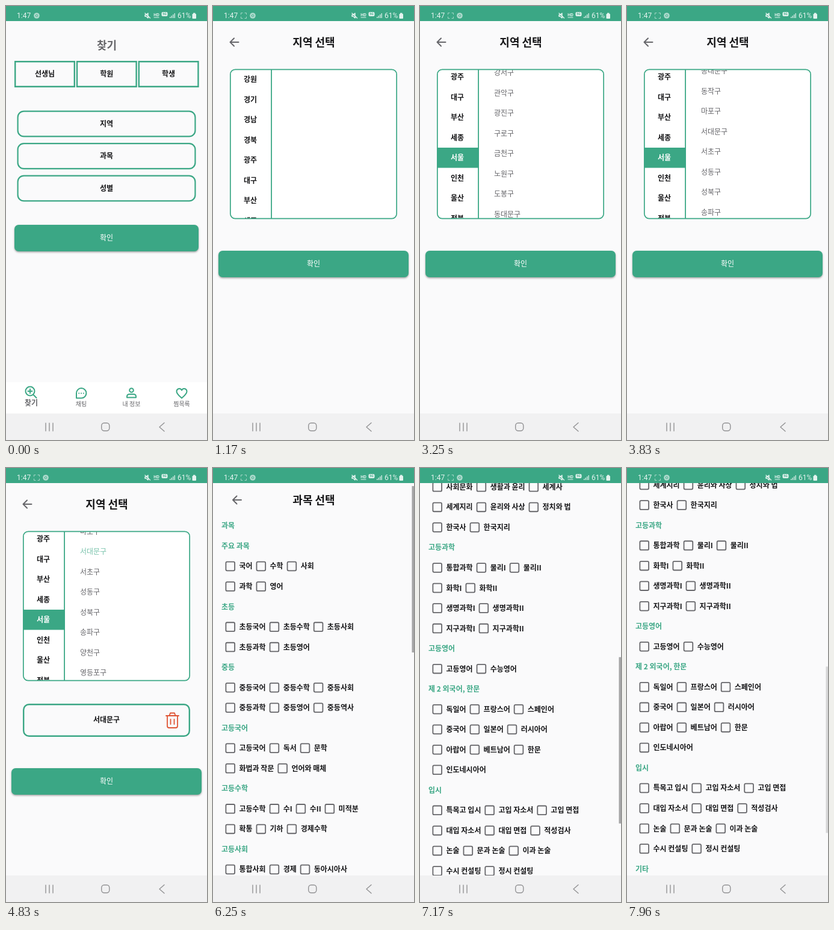
Write an HTML page with a canvas that moves like this. It is 334x720 px and loops after 8000 ms.

```html
<!DOCTYPE html>
<html lang="ko">
<head>
<meta charset="utf-8">
<style>
  html, body { margin: 0; width: 100%; height: 100%; overflow: hidden; background: #fafafa; }
  canvas { display: block; width: 334px; height: 720px; }
</style>
</head>
<body>
<canvas id="stage"></canvas>
<script>
const LOOP = 8000, W = 334, H = 720, ROW = 33.53, TOP = 25, BOTTOM = 676;
const GREEN = '#3ba785', PAGE = '#fafafb', GRAY = '#66666a', INK = '#151517';
const KOREAN = '"Noto Sans CJK KR", "Noto Sans CJK", sans-serif';

// Moments when the app changes state
const OPEN_REGION = 920, SHOW_DISTRICTS = 2500, PICK_CITY = 2640,
      PICK_DISTRICT = 4680, BACK_HOME = 5400, OPEN_SUBJECTS = 5970;

const cities = '강원 경기 경남 경북 광주 대구 부산 세종 서울 인천 울산 전북'.split(' ');
const districts = ('강남 강동 강북 강서 관악 광진 구로 금천 노원 도봉 동대문 동작 마포 서대문 ' +
  '서초 성동 성북 송파 양천 영등포 용산 은평 종로').split(' ').map(name => name + '구');
const subjects = `#과목
#주요 과목
국어,수학,사회
과학,영어
#초등
초등국어,초등수학,초등사회
초등과학,초등영어
#중등
중등국어,중등수학,중등사회
중등과학,중등영어,중등역사
#고등국어
고등국어,독서,문학
화법과 작문,언어와 매체
#고등수학
고등수학,수I,수II,미적분
확통,기하,경제수학
#고등사회
통합사회,경제,동아시아사
사회문화,생활과 윤리,세계사
세계지리,윤리와 사상,정치와 법
한국사,한국지리
#고등과학
통합과학,물리I,물리II
화학I,화학II
생명과학I,생명과학II
지구과학I,지구과학II
#고등영어
고등영어,수능영어
#제 2 외국어, 한문
독일어,프랑스어,스페인어
중국어,일본어,러시아어
아랍어,베트남어,한문
인도네시아어
#입시
특목고 입시,고입 자소서,고입 면접
대입 자소서,대입 면접,적성검사
논술,문과 논술,이과 논술
수시 컨설팅,정시 컨설팅
#기타`.split('\n');

const cityScroll = [[1420, 0], [1720, 78], [2170, 138]];
const districtScroll = [[2820, 0], [3200, 95], [3830, 349], [4050, 402], [4460, 418.5]];
const subjectScroll = [[6250, 0], [6450, 145], [6790, 510.6], [7080, 650], [7500, 705]];

const canvas = document.getElementById('stage');
const ctx = canvas.getContext('2d');
const ratio = window.devicePixelRatio || 1;
canvas.width = W * ratio;
canvas.height = H * ratio;

const clamp = x => Math.max(0, Math.min(1, x));

// Smooth monotone curve through [time, value] points, at rest at both ends
function track(points, t) {
  const last = points.length - 1;
  if (t <= points[0][0]) return points[0][1];
  if (t >= points[last][0]) return points[last][1];
  const slope = i => (points[i + 1][1] - points[i][1]) / (points[i + 1][0] - points[i][0]);
  const tangent = i => i === 0 || i === last ? 0
    : 2 * slope(i - 1) * slope(i) / (slope(i - 1) + slope(i));
  const i = points.findIndex((p, k) => t < points[k + 1][0]);
  const [t0, a] = points[i], [t1, b] = points[i + 1];
  const d = t1 - t0, u = (t - t0) / d, v = 1 - u;
  return a * (1 + 2 * u) * v * v + b * u * u * (3 - 2 * u)
    + d * u * v * (v * tangent(i) - u * tangent(i + 1));
}

// Text whose glyphs are vertically centred on y
function text(str, x, y, { size = 12, weight = 700, color = INK, align = 'center', family = KOREAN } = {}) {
  ctx.font = `${weight} ${size}px ${family}`;
  ctx.textAlign = align;
  ctx.fillStyle = color;
  ctx.fillText(str, x, y + size * 0.37);
}

function fillRect(x, y, w, h, color) {
  ctx.fillStyle = color;
  ctx.fillRect(x, y, w, h);
}

function box(x, y, w, h, radius, { fill, stroke, line = 2 }) {
  const inset = stroke ? line / 2 : 0;
  ctx.beginPath();
  ctx.roundRect(x + inset, y + inset, w - 2 * inset, h - 2 * inset, radius);
  if (fill) { ctx.fillStyle = fill; ctx.fill(); }
  if (stroke) { ctx.strokeStyle = stroke; ctx.lineWidth = line; ctx.stroke(); }
}

function icon(path, x, y, color, line = 2) {
  ctx.save();
  ctx.translate(x, y);
  ctx.strokeStyle = color;
  ctx.lineWidth = line;
  ctx.lineCap = ctx.lineJoin = 'round';
  ctx.stroke(new Path2D(path));
  ctx.restore();
}

function clipped(x, y, w, h, draw) {
  ctx.save();
  ctx.beginPath();
  ctx.rect(x, y, w, h);
  ctx.clip();
  draw();
  ctx.restore();
}

function confirmButton(x, y, w) {
  ctx.save();
  ctx.shadowColor = 'rgba(50,50,50,.45)';
  ctx.shadowBlur = 3 * ratio;
  ctx.shadowOffsetY = 1.5 * ratio;
  box(x, y, w, 44, 7, { fill: GREEN });
  ctx.restore();
  text('확인', 167, y + 22, { weight: 500, color: '#fff' });
}

function header(title, arrowX, y) {
  text(title, 167.5, y, { size: 18 });
  icon('M7 0H-7M-.5-6.5L-7 0L-.5 6.5', arrowX, y, GRAY);
}

function statusBar(t) {
  fillRect(0, 0, W, TOP, GREEN);
  const pale = '#e4f3ef', plain = { size: 12, weight: 400, color: pale, align: 'left', family: 'Roboto, sans-serif' };
  text('1:47', 18, 16, plain);
  const scanning = t >= OPEN_REGION;
  if (scanning) icon('M-2-4.5H-4.5V-2M2-4.5H4.5V-2M-2 4.5H-4.5V2M2 4.5H4.5V2', 51, 16, '#a5d6c7', 1);
  const dotX = scanning ? 66 : 51;
  ctx.beginPath();
  ctx.arc(dotX, 16, 4.8, 0, 7);
  ctx.fillStyle = '#aedacd';
  ctx.fill();
  icon('M-1.8 0A1.8 1.8 0 1 0 1.8 0A1.8 1.8 0 1 0-1.8 0', dotX, 16, GREEN, 0.8);
  icon('M-4-1.2H-2L1-4V4L-2 1.2H-4ZM-4-4L4.5 4', 235, 16, pale, 1.4);
  text('HD', 250, 14, { ...plain, size: 7, weight: 700, align: 'center' });
  icon('M-4 0H4', 250, 19, pale, 1);
  box(258.5, 10, 10, 7, 2, { fill: pale });
  text('5G', 263.5, 13.5, { ...plain, size: 5, weight: 700, color: GREEN, align: 'center' });
  for (let i = 0; i < 4; i++) fillRect(272 + i * 2.5, 18 - i * 2, 1.5, 2 + i * 2, '#c6e5db');
  text('61%', 285, 16, plain);
  box(309.5, 13, 6.5, 8, 1, { fill: pale });
  fillRect(311, 11.5, 3.5, 2, pale);
}

function navigationBar() {
  fillRect(0, BOTTOM, W, H - BOTTOM, '#f1f1f2');
  const color = '#929294';
  icon('M-6-6.5V6.5M0-6.5V6.5M6-6.5V6.5', 72, 698.5, color, 1.4);
  box(158, 691, 14.5, 14.5, 4.5, { stroke: color, line: 1.4 });
  icon('M4-7L-4 0L4 7', 259, 698.5, color, 1.4);
}

function home() {
  text('찾기', 167.5, 65, { size: 18, color: GRAY });
  ['선생님', '학원', '학생'].forEach((label, i) => {
    const x = 14 + i * 102.8;
    box(x, 91, 101, 44, 0, { stroke: GREEN, line: 2.4 });
    text(label, x + 50.5, 113);
  });
  ['지역', '과목', '성별'].forEach((label, i) => {
    const y = 173.5 + i * 53.5;
    box(18.5, y, 297, 44, 10, { stroke: GREEN, line: 2.2 });
    text(label, 167, y + 22);
  });
  confirmButton(14, 363, 306);

  fillRect(0, 624, W, BOTTOM - 624, '#fff');
  icon('M-9-2A7.5 7.5 0 1 0 6-2A7.5 7.5 0 1 0-9-2M4 4L9 9M-5-2H2M-1.5-5.5V1.5', 41.5, 641, GREEN);
  icon('M-8 8V0A8.2 8.2 0 1 1 0 8ZM-3.8 0h.1M0 0h.1M3.8 0h.1', 125, 642.5, GREEN);
  icon('M-3.3-4.5A3.3 3.3 0 1 0 3.3-4.5A3.3 3.3 0 1 0-3.3-4.5M-7.5 7.5V6Q-7.5 2-3 2H3Q7.5 2 7.5 6V7.5Z', 208.5, 642, GREEN);
  icon('M0 8C-4 4.5-8.5 1-8.5-3C-8.5-8-2.5-9.5 0-5C2.5-9.5 8.5-8 8.5-3C8.5 1 4 4.5 0 8Z', 292, 642.5, GREEN);
  text('찾기', 42, 659, { color: GRAY });
  ['채팅', '내 정보', '찜목록'].forEach((label, i) =>
    text(label, 125 + i * 83.5, 660, { size: 10, weight: 500, color: GRAY }));
}

function regionPage(t) {
  header('지역 선택', 35.5, 60);
  const picked = t >= PICK_DISTRICT;
  box(28, 104.5, 278, 249, 8, { fill: '#fff' });
  clipped(29, 105.5, 276, 247, () => {
    const cityShift = track(cityScroll, t), districtShift = track(districtScroll, t);
    cities.forEach((name, i) => {
      const y = 122 + i * 33.5 - cityShift;
      const active = name === '서울' && t >= PICK_CITY;
      if (active) fillRect(29, y - 17, 68, 33.5, GREEN);
      text(name, 62, y, { color: active ? '#fff' : INK });
    });
    fillRect(96.2, 105, 1.8, 248, GREEN);
    if (t < SHOW_DISTRICTS) return;
    districts.forEach((name, i) => {
      const chosen = picked && name === '서대문구';
      ctx.globalAlpha = chosen ? 0.3 + 0.7 * clamp((t - PICK_DISTRICT) / 280) : 1;
      text(name, 123, 122 + i * 33.5 - districtShift,
        { weight: 400, color: chosen ? GREEN : GRAY, align: 'left' });
      ctx.globalAlpha = 1;
    });
  });
  box(28, 104.5, 278, 249, 8, { stroke: GREEN, line: 1.7 });

  if (picked) {
    box(28, 391, 278, 55, 9, { stroke: GREEN, line: 2.4 });
    text('서대문구', 167, 417.5);
    icon('M-10.5-8H10.5M-5-8L-3.5-12.5H3.5L5-8M-8.5-8V9Q-8.5 12-5.5 12H5.5Q8.5 12 8.5 9V-8M-3-2V6M3-2V6',
      276.5, 419, '#df5535', 1.8);
  }
  confirmButton(9, picked ? 498 : 406, 316);
}

function subjectPage(t) {
  const shift = track(subjectScroll, t);
  clipped(0, TOP, W, BOTTOM - TOP, () => {
    header('과목 선택', 40, 53 - shift);
    subjects.forEach((row, i) => {
      const y = 96 + i * ROW - shift;
      if (y < 0 || y > H) return;
      if (row[0] === '#') return text(row.slice(1), 14, y, { color: GREEN, align: 'left' });
      let x = 20.5;
      for (const label of row.split(',')) {
        box(x, y - 8.3, 16.5, 16.5, 2, { stroke: GRAY, line: 1.8 });
        text(label, x + 23, y, { align: 'left' });
        x += 29 + ctx.measureText(label).width;
      }
    });
    const fade = 1 - clamp((t - 7790) / 300);
    fillRect(330.5, 30 + shift * 0.4247, 3.5, 276, `rgba(110,110,112,${0.6 * fade})`);
  });
}

function render(now) {
  const t = now % LOOP;
  ctx.setTransform(ratio, 0, 0, ratio, 0, 0);
  fillRect(0, 0, W, H, PAGE);
  if (t >= OPEN_SUBJECTS) subjectPage(t);
  else if (t >= OPEN_REGION && t < BACK_HOME) regionPage(t);
  else home();
  statusBar(t);
  navigationBar();
}

const start = performance.now();
function tick() {
  render(performance.now() - start);
  requestAnimationFrame(tick);
}
tick();
</script>
</body>
</html>
```
